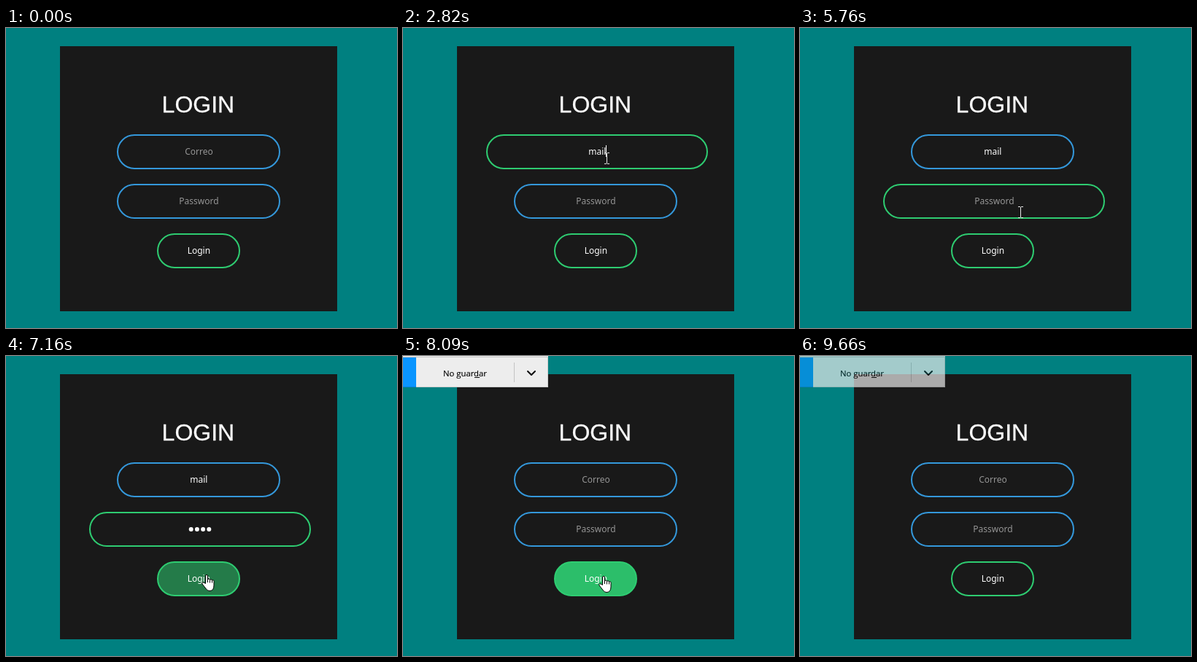
Write an HTML page that moves like this. It is 536 by 412 pixels and loops after 9730 ms.

```html
<!DOCTYPE html>
<html lang="es">
<head>
<meta charset="utf-8">
<title>Login</title>
<style>
  html, body { margin: 0; width: 100%; height: 100%; overflow: hidden; background: #008080; }
  svg { display: block; }
  text { font: 12px "Noto Sans", "Open Sans", sans-serif; fill: #fff; text-anchor: middle; }
  .title { font: 32px "Liberation Sans", Arial, sans-serif; stroke: #fff; stroke-width: .3; }
  .popup text { font: 11.3px "Open Sans", "Noto Sans", sans-serif; fill: #000; stroke: #000; stroke-width: .15; text-anchor: start; }
  .hint { fill: #959595; }
  .box { fill: none; stroke-width: 2; }
</style>
</head>
<body>
<svg width="536" height="412" viewBox="0 0 536 412">
  <rect x="74" y="25" width="380" height="364" fill="#191919"/>
  <text class="title" x="263.4" y="116">LOGIN</text>

  <g id="mail">
    <rect class="box" y="147" height="46" rx="23"/>
    <text y="174"></text>
    <rect class="caret" y="161" width="1" height="16" fill="#fff"/>
  </g>
  <g id="pass">
    <rect class="box" y="215" height="46" rx="23"/>
    <text y="242"></text>
    <g class="dots" fill="#fff"></g>
    <rect class="caret" y="229" width="1" height="16" fill="#fff"/>
  </g>

  <rect id="button" x="208" y="283" width="112" height="46" rx="23" stroke="#2ecc71" stroke-width="2"/>
  <text x="264.4" y="310">Login</text>
  <rect id="ring" x="247.5" y="298.5" width="33" height="15" fill="none" stroke="#111" stroke-dasharray="1" stroke-dashoffset=".5"/>

  <g id="popup" class="popup">
    <rect width="199" height="43" fill="#ededed"/>
    <rect y="1" width="199" height="1" fill="#c8c8c8"/>
    <rect y="2" width="18" height="41" fill="#0a95ff"/>
    <path d="M0 42.5H198.5V2" fill="none" stroke="#000" stroke-opacity=".15"/>
    <rect x="152" y="9" width="1" height="27" fill="#c4c4c4"/>
    <text x="55" y="28">No guardar</text>
    <rect x="98" y="29" width="7" height="1"/>
    <path d="M171 21l5 5 5-5" fill="none" stroke="#0c0c0d" stroke-width="2" stroke-linecap="round" stroke-linejoin="round"/>
  </g>

  <g id="pointer">
    <path id="beam" d="M-3 -7.5h3m1 0h3M.5 -7v14M-3 7.5h3m1 0h3" fill="none" stroke="#e8e8e8"/>
    <path id="arrow" d="M-.5 .5V16.5L3.2 13L5.7 18.5L8 17.5L5.6 12.2H10.5Z" fill="#fff" stroke="#000"/>
    <g id="hand" transform="translate(-7 0)" stroke="#000">
      <path d="M5.5 12.5V2Q5.5 .5 7 .5T8.5 2V7Q8.5 6 10 6T11.5 7.5Q11.5 6.8 13 6.8T14.5 8.5Q14.5 7.8 15.8 7.8T17 9.5V15Q17 22.5 11 22.5Q8 22.5 6.5 20L1 13Q.3 11.5 1.5 10.8Q2.8 10.5 5.5 12.5Z" fill="#fff"/>
      <path d="M8.5 7v4M11.5 7.5v4M14.5 8.5v3" fill="none"/>
    </g>
  </g>
</svg>
<script>
const LOOP = 9730, FRAME = 77.9, FADE = 250, BLINK = 530, DOT_STEP = 8.2;
const START = 450, MAIL_FOCUS = 1215, PASS_FOCUS = 4130, CLICK = 7630, RELOAD = 7930, EXIT = 9020;
const DARK = [25, 25, 25], BLUE = [52, 152, 219], GREEN = [46, 204, 113];
const MAIL_KEYS = [2030, 2110, 2670, 2820], PASS_KEYS = [6220, 6300, 6380, 6530];

// pointer moves: start, end, and the place reached
const ENTRY = [422, 375];
const MOVES = [
  [START, 1200, 279, 179],
  [4660, 5370, 302, 253],
  [6950, 7148, 275, 300],
  [7550, CLICK, 275, 302],
  [8785, 8940, 373, 399]
];

const $ = id => document.getElementById(id);
const clamp = x => Math.min(1, Math.max(0, x));
const mix = (a, b, p) => `rgb(${a.map((v, i) => Math.round(v + (b[i] - v) * p))})`;
const show = (el, on) => el.setAttribute("visibility", on ? "visible" : "hidden");
const set = (el, attrs) => { for (const k in attrs) el.setAttribute(k, attrs[k]); };
const typed = (keys, t) => t < RELOAD ? keys.filter(k => k <= t).length : 0;
const blink = (t, start) => Math.floor((t - start) / BLINK) % 2 === 0;

// cubic-bezier(.25, .1, .25, 1)
function ease(x) {
  if (x <= 0) return 0;
  if (x >= 1) return 1;
  const bez = (a, b, s) => 3 * a * s * (1 - s) ** 2 + 3 * b * s * s * (1 - s) + s ** 3;
  let lo = 0, hi = 1;
  for (let i = 0; i < 24; i++) {
    const mid = (lo + hi) / 2;
    if (bez(.25, .25, mid) < x) lo = mid; else hi = mid;
  }
  return bez(.1, 1, lo);
}
const since = (t, start) => ease((t - start) / FADE);

// Resizes a field and returns its centre; a wide one sticks to the left edge.
function drawField(group, focus) {
  const w = 224 + 80 * focus, left = Math.max(114, 264 - w / 2);
  set(group.querySelector(".box"), { x: left + 1, width: w - 2, stroke: mix(BLUE, GREEN, focus) });
  return left + w / 2;
}

function drawText(group, cx, value, hint) {
  const text = group.querySelector("text");
  text.textContent = value || hint;
  set(text, { x: cx + .4, class: value ? "" : "hint" });
  return value ? text.getComputedTextLength() : 0;
}

function drawCaret(group, x, on) {
  const caret = group.querySelector(".caret");
  caret.setAttribute("x", Math.round(x));
  show(caret, on);
}

// t is the exact time, f the time of the last refresh of moving parts
function drawMail(t, f) {
  const g = $("mail"), cx = drawField(g, since(f, MAIL_FOCUS) - since(f, PASS_FOCUS));
  const w = drawText(g, cx, "mail".slice(0, typed(MAIL_KEYS, t)), "Correo");
  drawCaret(g, cx + w / 2, t >= MAIL_FOCUS && t < PASS_FOCUS && blink(t, 1710));
}

function drawPass(t, f) {
  const g = $("pass"), cx = drawField(g, since(f, PASS_FOCUS) - since(f, CLICK + 25));
  const n = typed(PASS_KEYS, t);
  drawText(g, cx, "", n ? "" : "Password");
  dots.forEach((dot, i) => {
    dot.setAttribute("cx", cx + (i - (n - 1) / 2) * DOT_STEP);
    show(dot, i < n);
  });
  drawCaret(g, cx + n * DOT_STEP / 2, t >= PASS_FOCUS && t < CLICK && blink(t, PASS_FOCUS + 10));
}

function drawButton(t, f) {
  const hover = f < RELOAD - 10 ? since(f, 7070) : since(f, RELOAD - 10) - since(f, 8863);
  $("button").setAttribute("fill", mix(DARK, GREEN, hover));
  show($("ring"), t >= CLICK && t < RELOAD);
}

function drawPopup(f) {
  $("popup").setAttribute("opacity", clamp((f - CLICK) / FADE) - clamp((f - 9565) / FADE));
}

function drawPointer(t, f) {
  let [x, y] = ENTRY;
  for (const [from, to, toX, toY] of MOVES) {
    const p = clamp((f - from) / (to - from));
    x += (toX - x) * p;
    y += (toY - y) * p;
  }
  x = Math.round(x);
  y = Math.round(y);
  const on = t >= START && t < EXIT;
  const inField = x > 152 && x < 376 && (y > 146 && y < 194 || y > 214 && y < 262);
  const inButton = x > 207 && x < 321 && y > 282 && y < 330;
  $("pointer").setAttribute("transform", `translate(${x} ${y})`);
  show($("beam"), on && inField);
  show($("hand"), on && inButton);
  show($("arrow"), on && !inField && !inButton);
}

const dots = Array.from({ length: 4 }, () => {
  const dot = document.createElementNS("http://www.w3.org/2000/svg", "circle");
  set(dot, { r: 3, cy: 238 });
  return document.querySelector(".dots").appendChild(dot);
});

const origin = performance.now();
function draw() {
  const t = (performance.now() - origin) % LOOP;
  const f = START + Math.floor((t - START) / FRAME) * FRAME;
  drawMail(t, f);
  drawPass(t, f);
  drawButton(t, f);
  drawPopup(f);
  drawPointer(t, f);
  requestAnimationFrame(draw);
}
draw();
</script>
</body>
</html>
```
